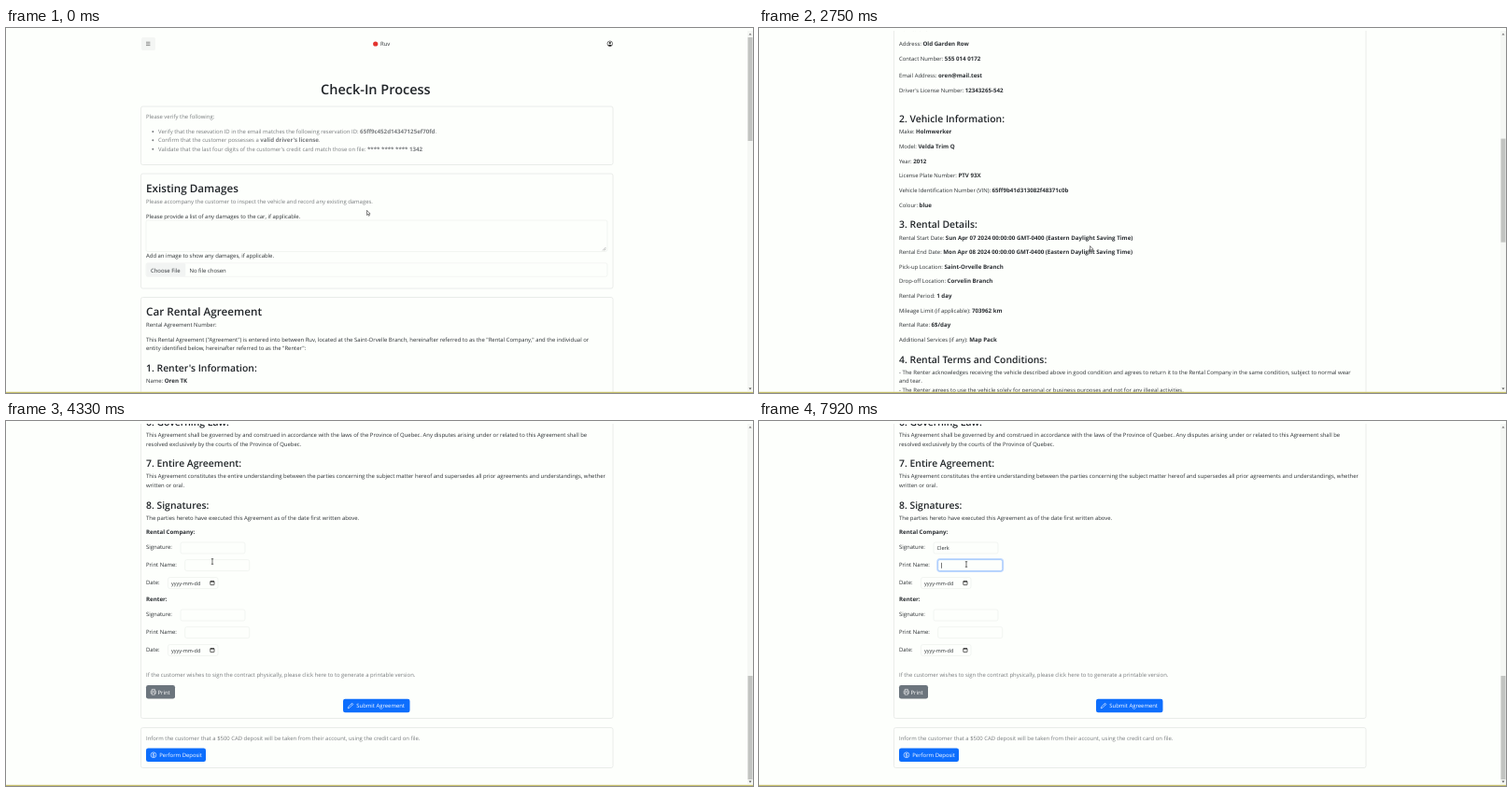
These frames come from a looping animation (800 by 391 pixels, 8 s). An HTML page with a canvas:

```html
<!DOCTYPE html>
<html lang="en">
<head>
<meta charset="utf-8">
<title>Check-In Process</title>
<style>
  html, body { margin: 0; width: 100%; height: 100%; overflow: hidden; background: #fdfffc; }
  canvas { display: block; width: 800px; height: 391px; }
</style>
</head>
<body>
<canvas id="stage"></canvas>
<script>
const LOOP = 8000, STEP = 1000 / 12;
const PAGE = '#fdfffc', INK = '#2b2f33', MUTED = '#787b7e', BLUE = '#0d6efd';
const CARD_LINE = '#e5e8e5', FIELD_LINE = '#ebeeeb';
const END = 913.5; // scroll position at the foot of the page
const canvas = document.getElementById('stage');
const ctx = canvas.getContext('2d');
const ratio = window.devicePixelRatio || 1;
canvas.width = 800 * ratio;
canvas.height = 391 * ratio;

// Keys are [time, value, slope]; cubic Hermite between them.
const scrollKeys = [[1920, 0], [28 * STEP, 129, .45], [33 * STEP, 377, .8], [40 * STEP, 889.5, .4], [42 * STEP, END]];
const xKeys = [[250, 386.5], [580, 356], [2340, 356], [2750, 354.5], [3500, 354.5], [4330, 221], [4600, 220], [6760, 220], [7170, 222]];
const yKeys = [[250, 195.3], [580, 230], [2340, 230], [2750, 233.5], [3500, 233.5], [4330, 150.5], [4600, 138.5], [6760, 138.5], [7170, 153.5]];

function track(keys, t) {
  const i = keys.findIndex(k => k[0] > t);
  if (i === 0) return keys[0][1];
  if (i < 0) return keys[keys.length - 1][1];
  const [t0, a, va = 0] = keys[i - 1], [t1, b, vb = 0] = keys[i];
  const d = t1 - t0, u = (t - t0) / d, w = 1 - u;
  return w * w * ((1 + 2 * u) * a + u * d * va) + u * u * ((3 - 2 * u) * b - w * d * vb);
}

// Parts between bars are bold; y is the middle of the capitals. Returns the right end.
function text(x, y, str, { size = 5.93, color = INK, weight = 400 } = {}) {
  ctx.fillStyle = color;
  str.split('|').forEach((part, i) => {
    ctx.font = `${i % 2 ? 700 : weight} ${i % 2 ? size * 1.04 : size}px "Open Sans", "Noto Sans", sans-serif`;
    ctx.fillText(part, x, y + size * .36);
    x += ctx.measureText(part).width;
  });
  return x;
}
const muted = (x, y, str) => text(x, y, str, { color: MUTED });
const heading = (y, str, size = 10.4, x = 150) => text(x, y + .4, str, { size, weight: 600, color: '#212529' });
const lines = rows => rows.forEach(([y, str]) => text(150, y, str));

function box(x, y, w, h, r, fill, stroke, width = .6) {
  ctx.beginPath();
  ctx.roundRect(x, y, w, h, r);
  if (fill) { ctx.fillStyle = fill; ctx.fill(); }
  if (stroke) { ctx.strokeStyle = stroke; ctx.lineWidth = width; ctx.stroke(); }
}
const card = (y, h) => box(144.5, y, 505.5, h, 2, null, CARD_LINE, .8);

function path(d, color, width, x = 0, y = 0) {
  const p = new Path2D(d);
  ctx.save();
  ctx.translate(x, y);
  if (width) { ctx.strokeStyle = color; ctx.lineWidth = width; ctx.stroke(p); }
  else { ctx.fillStyle = color; ctx.fill(p); }
  ctx.restore();
}
function circle(x, y, r, fill, stroke) {
  box(x - r, y - r, 2 * r, 2 * r, r, fill, stroke);
}

function field(x, y, w, h, focused) {
  if (focused) box(x, y, w, h, 2.3, null, '#c2dafe', 3);
  box(x, y, w, h, 2, PAGE, focused ? '#86b7fe' : FIELD_LINE);
}
function typed(x, y, str, size, caret) {
  const end = text(x, y, str, { size });
  if (caret) { ctx.fillStyle = '#222'; ctx.fillRect(end + .2, y - 3, .6, 6); }
}
function button(x, y, w, label, color, inset = 14.3) {
  box(x, y, w, 14.5, 2.3, color);
  text(x + inset, y + 7.4, label, { color: '#fff' });
}

const blink = (t, start) => t >= start && (t - start) % 1060 < 530;
const typing = (word, times, t) => word.slice(0, times.filter(at => t >= at).length);

function drawTop(t) {
  box(145, 10, 15, 14, 2, '#f4f6f4');
  path('M0 0h4.4M0 1.7h4.4M0 3.4h4.4', '#555', .6, 150, 15.2);
  circle(395.7, 17, 2.6, '#e3342f');
  text(401, 17.2, 'Ruv');
  circle(646.8, 16.8, 2.8, null, '#222');
  circle(646.8, 16, 1.1, '#222');
  path('M-2 2C-1.2 .6 1.2 .6 2 2Q0 3.6-2 2', '#222', 0, 646.8, 16.8);
  heading(65.3, 'Check-In Process', 14.5, 337);

  card(84, 62.5);
  muted(150, 95.2, 'Please verify the following:');
  ['Verify that the resevation ID in the email matches the following reservation ID: |65ff9c452d14347125ef70fd|.',
   "Confirm that the customer possesses a |valid driver's license|.",
   "Validate that the last four digits of the customer's credit card match those on file: |**** **** **** 1342|"]
    .forEach((str, i) => {
      circle(157.3, 111 + i * 9.36, 1, MUTED);
      muted(163, 110.8 + i * 9.36, str);
    });

  card(156, 123);
  heading(171, 'Existing Damages', 11.7);
  muted(150, 185.7, 'Please accompany the customer to inspect the vehicle and record any existing damages.');
  text(150, 201.5, 'Please provide a list of any damages to the car, if applicable.');
  const focused = t >= 580 && t < 4670;
  field(150, 206, 494, 33.5, focused);
  typed(155, 213.7, typing('None', [920, 1080, 1250, 1420], t), 5.93, focused && t < 2200 && blink(t, 580));
  path('M0 3.4L3.4 0M1.8 3.4L3.4 1.8', '#777', .5, 639, 235);
  text(150, 244.2, 'Add an image to show any damages, if applicable.');
  field(150, 251.8, 494, 14.5);
  box(150.3, 252.1, 42, 13.9, 1.5, '#f2f4f3');
  text(155, 259.5, 'Choose File');
  text(196.5, 259.5, 'No file chosen');
}

function drawAgreement() {
  card(288.5, 943.5);
  heading(303.3, 'Car Rental Agreement', 11.7);
  heading(364, "1. Renter's Information:");
  heading(474, '2. Vehicle Information:');
  heading(587, '3. Rental Details:');
  heading(732, '4. Rental Terms and Conditions:');
  heading(873, '5. Indemnification:');
  lines([
    [318, 'Rental Agreement Number:'],
    [334, 'This Rental Agreement ("Agreement") is entered into between Ruv, located at the Saint-Orvelle Branch, hereinafter referred to as the "Rental Company," and the individual or'],
    [343.3, 'entity identified below, hereinafter referred to as the "Renter":'],
    [378.3, 'Name: |Oren TK|'],
    [394, 'Address: |Old Garden Row|'],
    [409.6, 'Contact Number: |555 014 0172|'],
    [428.3, 'Email Address: |oren@mail.test|'],
    [444, "Driver's License Number: |12343265-542|"],
    [488.3, 'Make: |Holmwerker|'],
    [504, 'Model: |Velda Trim Q|'],
    [519.6, 'Year: |2012|'],
    [535.2, 'License Plate Number: |PTV 93X|'],
    [550.9, 'Vehicle Identification Number (VIN): |65ff9b41d313082f48371c0b|'],
    [566.5, 'Colour: |blue|'],
    [601.5, 'Rental Start Date: |Sun Apr 07 2024 00:00:00 GMT-0400 (Eastern Daylight Saving Time)|'],
    [617.1, 'Rental End Date: |Mon Apr 08 2024 00:00:00 GMT-0400 (Eastern Daylight Saving Time)|'],
    [632.7, 'Pick-up Location: |Saint-Orvelle Branch|'],
    [648.3, 'Drop-off Location: |Corvelin Branch|'],
    [664, 'Rental Period: |1 day|'],
    [679.6, 'Mileage Limit (if applicable): |703962 km|'],
    [695.2, 'Rental Rate: |6$/day|'],
    [710.9, 'Additional Services (if any): |Map Pack|'],
    [887, "The Renter agrees to indemnify and hold harmless the Rental Company from any claims, liabilities, damages, or expenses arising out of or"],
    [896.4, "related to the Renter's use of the vehicle."],
  ]);
  ['- The Renter acknowledges receiving the vehicle described above in good condition and agrees to return it to the Rental Company in the same condition, subject to normal wear',
   'and tear.',
   '- The Renter agrees to use the vehicle solely for personal or business purposes and not for any illegal activities.',
   '- The Renter agrees to pay the Rental Company the specified rental rate for the duration of the rental period. Additional charges may apply for exceeding the mileage limit,',
   'late returns, fuel refueling, or other damages.',
   '- The Renter agrees to bear all costs associated with traffic violations, tolls, and parking fees incurred during the rental period.',
   '- The Renter acknowledges that they are responsible for any loss or damage to the vehicle, including theft, vandalism, accidents, or negligence, and agrees to reimburse the',
   'Rental Company for all repair or replacement costs.',
   '- The Renter agrees to return the vehicle to the designated drop-off location at the agreed-upon date and time.',
   '- The Rental Company reserves the right to terminate this agreement and repossess the vehicle without prior notice if the Renter breaches any terms or conditions of this',
   'Agreement.',
   '- The Renter acknowledges receiving and reviewing a copy of the vehicle\'s insurance coverage and agrees to comply with all insurance requirements during the rental period.']
    .forEach((str, i) => text(150, 746 + i * 9.36, str));
}

// Coordinates from here on are those of the page scrolled to its foot.
function drawSignatures(t) {
  heading(1, '6. Governing Law:');
  heading(45.2, '7. Entire Agreement:');
  heading(89.6, '8. Signatures:');
  lines([
    [15, 'This Agreement shall be governed by and construed in accordance with the laws of the Province of Quebec. Any disputes arising under or related to this Agreement shall be'],
    [24.4, 'resolved exclusively by the courts of the Province of Quebec.'],
    [59.3, 'This Agreement constitutes the entire understanding between the parties concerning the subject matter hereof and supersedes all prior agreements and understandings, whether'],
    [68.7, 'written or oral.'],
    [103.7, 'The parties hereto have executed this Agreement as of the date first written above.'],
    [119.2, '|Rental Company:|'],
    [191.1, '|Renter:|'],
  ]);
  const onSign = t >= 4670 && t < 7250, onPrint = t >= 7250;
  for (const y of [0, 72]) {
    const first = y === 0;
    lines([[y + 135, 'Signature:'], [y + 153.7, 'Print Name:'], [y + 172.6, 'Date:']]);
    field(187, y + 130, 69, 12, first && onSign);
    field(191.7, y + 148.6, 69, 12, first && onPrint);
    field(173.5, y + 167.5, 53.5, 12);
    text(177, y + 174, 'yyyy-mm-dd', { size: 5.45 });
    box(218.8, y + 171.6, 4.2, 4, .4, null, '#222', .7);
    path('M0 0h4.2', '#222', 1.1, 218.8, y + 172);
  }
  typed(190.5, 136.2, typing('Clerk', [5500, 5920, 6250, 6420, 6580], t), 5.6, onSign && (t >= 6580 || blink(t, 4670)));
  typed(195, 154.8, '', 5.6, onPrint && blink(t, 7400));

  muted(150, 272.2, 'If the customer wishes to sign the contract physically, please click here to to generate a printable version.');
  button(150, 283, 31, 'Print', '#6c757d', 12.5);
  path('M1.2 1.8V0h3.2v1.8M1.2 4.4H.2V1.8h5.2v2.6h-1M1.2 3.4h3.2v2.4h-3.2z', '#fff', .55, 155, 287.4);
  button(361, 297.8, 71.5, 'Submit Agreement', BLUE);
  path('M.2 5.8L.8 4 4.6.2 5.8 1.4 2 5.2zM3.6 1.2l1.2 1.2', '#fff', .6, 366, 302);

  card(328.5, 43);
  muted(150, 339.9, 'Inform the customer that a $500 CAD deposit will be taken from their account, using the credit card on file.');
  button(150, 350.5, 64, 'Perform Deposit', BLUE);
  circle(158, 357.8, 2.9, null, '#fff');
  path('M1.1-1C.6-1.8-1.1-1.6-1-.7-.9.2 1.1-.1 1.1.9 1 1.8-.8 1.7-1.2.9M0-2V2', '#fff', .5, 158, 357.8);
}

function drawFrame(scroll) {
  ctx.fillStyle = '#f5f7f4';
  ctx.fillRect(794, 3, 6, 386);
  ctx.fillStyle = '#c2c4c1';
  ctx.fillRect(794.5, 10 + scroll * 263 / END, 5, 111);
  path('M-1.5 1L0-1 1.5 1z', '#777', 0, 797, 6.5);
  path('M-1.5-1L0 1 1.5-1z', '#555', 0, 797, 386.5);
  ctx.fillStyle = '#c6bf6c';
  ctx.fillRect(0, 389.8, 800, 1.2);
}

function drawCursor(t) {
  const x = track(xKeys, t), y = track(yKeys, t);
  if ((t >= 450 && t < 2500) || t >= 4100) {
    path('M-1.2-2.8H1.2M0-2.8V2.8M-1.2 2.8H1.2', '#333', .7, x, y);
  } else {
    const arrow = 'M0 0V5.2L1.2 4.1 2 6 2.8 5.6 2 3.8H3.6z';
    path(arrow, '#fff', 0, x, y);
    path(arrow, '#333', .6, x, y);
  }
}

function draw(now) {
  const t = Math.floor((now % LOOP + 5) / STEP) * STEP;
  const scroll = track(scrollKeys, t);
  ctx.setTransform(ratio, 0, 0, ratio, 0, 0);
  ctx.textRendering = 'geometricPrecision';
  ctx.fillStyle = PAGE;
  ctx.fillRect(0, 0, 800, 391);
  ctx.save();
  ctx.beginPath();
  ctx.rect(0, 3, 794, 386.8);
  ctx.clip();
  ctx.translate(0, -scroll);
  drawTop(t);
  drawAgreement();
  ctx.translate(0, END);
  drawSignatures(t);
  ctx.restore();
  drawFrame(scroll);
  drawCursor(t);
}

const start = performance.now();
(function loop() {
  draw(performance.now() - start);
  requestAnimationFrame(loop);
})();
</script>
</body>
</html>
```
